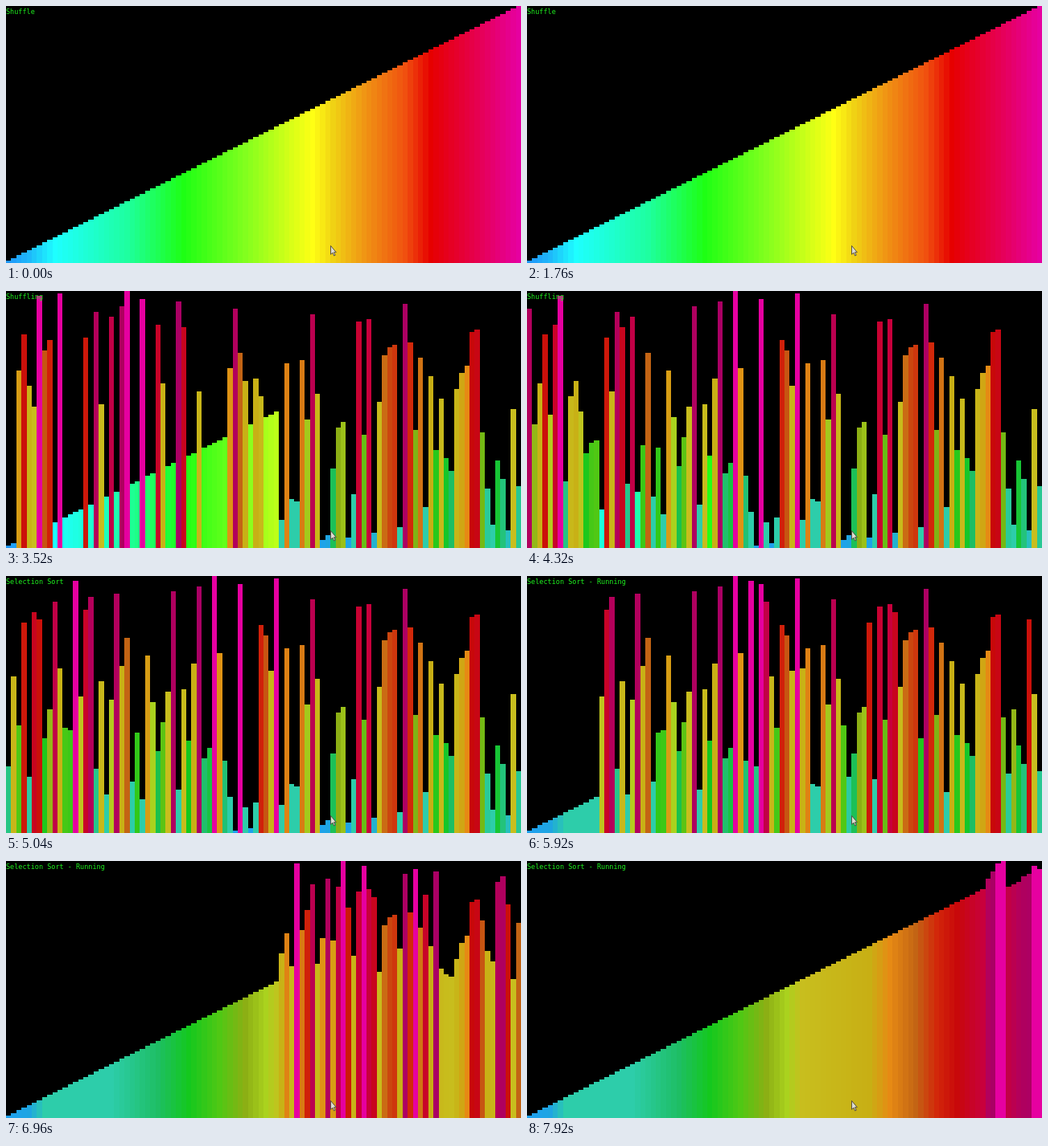
Write an HTML page with a canvas that moves like this. It is 640 by 320 pixels and loops after 8000 ms.

```html
<!DOCTYPE html>
<html lang="en">
<head>
<meta charset="utf-8">
<title>Selection Sort</title>
<style>
  html, body { margin: 0; width: 100%; height: 100%; overflow: hidden; background: #000; }
  canvas { display: block; width: 640px; height: 320px; }
</style>
</head>
<body>
<canvas id="stage" width="640" height="320"></canvas>
<script>
const ctx = document.getElementById('stage').getContext('2d');
const COUNT = 100, LOOP = 8000, TICK = 80;
const BAR_W = 640 / COUNT, UNIT = 320 / COUNT;

// Order of the bars once the shuffle is complete.
const SHUFFLED = [
  26, 61, 42, 82, 22, 86, 83, 37, 48, 90,
  64, 41, 40, 98, 53, 87, 92, 25, 59, 15,
  52, 93, 65, 76, 20, 39, 13, 69, 51, 32,
  43, 55, 94, 17, 56, 36, 66, 96, 29, 33,
  100, 70, 28, 14, 1, 97, 10, 2, 12, 81,
  77, 63, 99, 11, 72, 19, 18, 73, 50, 91,
  60, 3, 5, 31, 47, 49, 4, 21, 88, 44,
  89, 6, 57, 75, 78, 79, 8, 95, 80, 46,
  74, 16, 67, 38, 58, 35, 30, 62, 68, 71,
  84, 85, 45, 23, 9, 34, 27, 7, 54, 24
];

// Colour stops by bar value: vivid while untouched, muted once moved.
const VIVID = [
  [1, '#1e96fa'], [5, '#1eb9fa'], [10, '#1effff'], [24, '#1effa0'], [35, '#1eff14'],
  [47, '#82ff1e'], [60, '#ffff14'], [64, '#f0d214'], [70, '#f09614'], [78, '#f0500f'],
  [83, '#e60000'], [92, '#e60050'], [100, '#e600a0']
];
const MUTED = [
  [1, '#1ea0f0'], [5, '#1ea5e1'], [8, '#2dcdaa'], [21, '#2dcdaa'], [30, '#1ebe64'],
  [36, '#14c81e'], [42, '#50c814'], [47, '#8caf14'], [51, '#aad21e'], [54, '#c8be1e'],
  [67, '#c8af14'], [71, '#e68a14'], [76, '#c36414'], [80, '#d2280a'], [84, '#c8080a'],
  [89, '#c8003c'], [92, '#b4005a'], [96, '#aa0064'], [97, '#e600a0'], [100, '#e600a0']
];

const channels = hex => [1, 3, 5].map(k => parseInt(hex.slice(k, k + 2), 16));

function colorAt(stops, value) {
  const k = Math.max(1, stops.findIndex(([v]) => v >= value));
  const [v0, c0] = stops[k - 1], [v1, c1] = stops[k];
  const p = (value - v0) / (v1 - v0), to = channels(c1);
  return `rgb(${channels(c0).map((c, n) => Math.round(c + (to[n] - c) * p))})`;
}

const palette = stops => Array.from({ length: COUNT }, (_, i) => colorAt(stops, i + 1));
const vivid = palette(VIVID), muted = palette(MUTED);

const clamp = n => Math.min(COUNT, Math.max(0, n));

function swap(list, a, b) {
  [list[a], list[b]] = [list[b], list[a]];
}

function arrange(shuffleSteps, sortSteps) {
  const bars = Array.from({ length: COUNT }, (_, i) => i + 1);
  for (let i = COUNT - 1; i >= COUNT - shuffleSteps; i--) swap(bars, i, bars.indexOf(SHUFFLED[i]));
  for (let i = 0; i < sortSteps; i++) swap(bars, i, bars.indexOf(i + 1));
  return bars;
}

function labelFor(shuffleSteps, sortSteps) {
  if (!shuffleSteps) return 'Shuffle';
  if (shuffleSteps < COUNT) return 'Shuffling';
  return sortSteps ? 'Selection Sort - Running' : 'Selection Sort';
}

const pointer = new Path2D(
  'M403.5 298.5V309.3L405.9 307.2L407.6 311L409.2 310.3L407.5 306.7H410.3Z');

function draw(tick) {
  const shuffleSteps = clamp(3 * tick - 85);
  const sortSteps = clamp(3 * tick - 208);

  ctx.fillStyle = '#000';
  ctx.fillRect(0, 0, 640, 320);

  arrange(shuffleSteps, sortSteps).forEach((value, i) => {
    const moved = shuffleSteps === COUNT || value !== i + 1;
    const left = Math.round(i * BAR_W), right = Math.round((i + 1) * BAR_W);
    const top = Math.round(320 - value * UNIT);
    ctx.fillStyle = (moved ? muted : vivid)[value - 1];
    ctx.fillRect(left, top, right - left, 320 - top);
  });

  ctx.font = '8.5px "DejaVu Sans Mono", monospace';
  ctx.fillStyle = '#1ef01e';
  ctx.fillText(labelFor(shuffleSteps, sortSteps), 0, 9.5);

  ctx.fillStyle = '#dcdcd2';
  ctx.fill(pointer);
  ctx.strokeStyle = '#50463c';
  ctx.lineWidth = 0.9;
  ctx.stroke(pointer);
}

const start = performance.now();
function play() {
  draw(Math.floor((performance.now() - start) % LOOP / TICK));
  requestAnimationFrame(play);
}
play();
</script>
</body>
</html>
```
